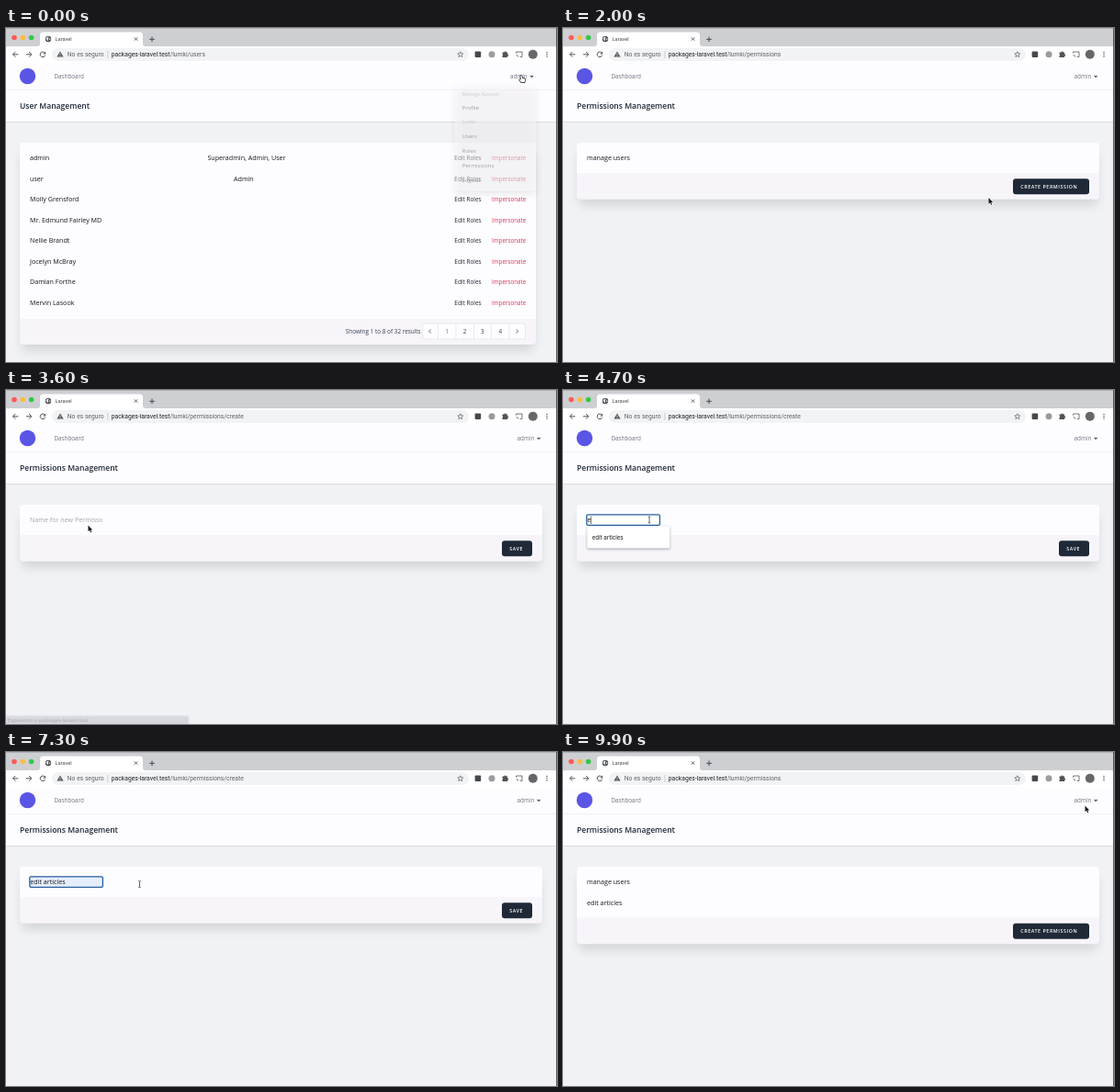
An HTML page with a canvas for the animation above (10 s loop, 600 px wide and 364 px high).

```html
<!DOCTYPE html>
<html lang="es">
<head>
<meta charset="utf-8">
<title>Laravel</title>
<style>
  html, body { margin: 0; width: 100%; height: 100%; overflow: hidden; background: #f0f2f6; }
  canvas { display: block; width: 600px; height: 364px; }
</style>
</head>
<body>
<canvas id="stage"></canvas>
<script>
const W = 600, H = 364, LOOP = 10000, STEP = 100;
const canvas = document.getElementById('stage');
const ctx = canvas.getContext('2d');
const dpr = Math.max(1, window.devicePixelRatio || 1);
canvas.width = W * dpr;
canvas.height = H * dpr;

const PAGE = '"Open Sans", sans-serif';
const UI = 'Roboto, sans-serif';
const INK = '#16181d', DARK = '#1f2937', GREY = '#6b7280', RED = '#d8365f';

const PEOPLE = ['admin', 'user', 'Molly Grensford', 'Mr. Edmund Fairley MD',
  'Nellie Brandt', 'Jocelyn McBray', 'Damian Forthe', 'Mervin Lasook'];
const MENU = [['Manage Account', 72, 1], ['Profile', 87], ['Lumki', 103, 1], ['Users', 119],
  ['Roles', 135], ['Permissions', 152], ['Logout', 168]];
const HINTS = ['edit articles', 'manage users', 'create articles', 'delete articles',
  'publish articles', 'view articles'];

// time, x, y of the pointer tip
const PATH = [[0, 561, 52], [200, 561, 52], [500, 540, 85], [800, 522, 122], [1000, 516, 150],
  [1100, 517, 151], [1300, 525, 157.5], [1600, 502, 170], [2000, 463.5, 185], [2300, 464, 185],
  [2600, 516, 174], [2800, 522, 171], [3000, 490, 172], [3300, 250, 160], [3600, 89.5, 147.5],
  [4000, 93, 142], [4200, 94, 141.5], [7200, 94, 141.5], [7600, 300, 152], [8000, 548, 172],
  [8300, 564, 171.5], [8900, 564, 171.5], [9400, 563, 173.5], [9600, 561, 140], [9900, 568.5, 58.5]];
const POINTERS = [[0, 'hand'], [300, 'arrow'], [500, 'hand'], [1200, 'arrow'], [2600, 'hand'],
  [2900, 'arrow'], [4000, 'beam'], [5600, 'none'], [7300, 'beam'], [7400, 'arrow'],
  [8000, 'hand'], [9000, 'arrow']];
const TYPED = [[0, ''], [4700, 'e'], [4900, 'ed'], [5100, 'edi'], [5300, 'edit'], [5600, 'edit '],
  [5800, 'edit a'], [6000, 'edit ar'], [6200, 'edit art'], [7000, 'edit articles']];
const URLS = [[0, 'users'], [1200, 'permissions'], [2900, 'permissions/create'], [8800, 'permissions']];
const SCREENS = [[0, 'users'], [1600, 'list'], [3400, 'form'], [8900, 'list']];

const at = (steps, t) => steps.filter(s => s[0] <= t).pop()[1];
const within = (t, a, b) => t >= a && t < b;
const ramp = (t, a, b) => Math.min(1, Math.max(0, (t - a) / (b - a)));

function text(s, x, y, size, color, opt = {}) {
  ctx.font = `${opt.weight || 400} ${size}px ${opt.font || PAGE}`;
  ctx.letterSpacing = (opt.spacing || 0) + 'px';
  ctx.textBaseline = 'alphabetic';
  ctx.fillStyle = color;
  ctx.fillText(s, x, y + size * 0.36);
  const w = ctx.measureText(s).width;
  ctx.letterSpacing = '0px';
  return w;
}

function rect(x, y, w, h, color, r = 0) {
  ctx.fillStyle = color;
  ctx.beginPath();
  ctx.roundRect(x, y, w, h, r);
  ctx.fill();
}

function dot(x, y, r, color) {
  ctx.fillStyle = color;
  ctx.beginPath();
  ctx.arc(x, y, r, 0, 7);
  ctx.fill();
}

function stroke(d, color, width = 1, x = 0, y = 0) {
  ctx.save();
  ctx.translate(x, y);
  ctx.strokeStyle = color;
  ctx.lineWidth = width;
  ctx.stroke(new Path2D(d));
  ctx.restore();
}

function fillPath(d, color, x, y) {
  ctx.save();
  ctx.translate(x, y);
  ctx.fillStyle = color;
  ctx.fill(new Path2D(d));
  ctx.restore();
}

function shadowed(color, blur, dy, draw) {
  ctx.save();
  ctx.shadowColor = color;
  ctx.shadowBlur = blur * dpr;
  ctx.shadowOffsetY = dy * dpr;
  draw();
  ctx.restore();
}

function faded(alpha, draw) {
  if (alpha <= 0) return;
  ctx.save();
  ctx.globalAlpha = alpha;
  draw();
  ctx.restore();
}

function browser(t) {
  const loading = within(t, 1100, 1600) || within(t, 2900, 3400);
  rect(0, 0, W, 20, '#cecfd3');
  rect(0, 0, W, 0.7, '#aaabaf');
  ['#fc5b57', '#fdbc40', '#34c84a'].forEach((c, i) => dot(9 + 9.3 * i, 10.5, 2.8, c));
  fillPath('M34 20Q37 20 37 17V8Q37 4.5 40.500 4.500H145.500Q149 4.500 149 8V17Q149 20 152 20Z', '#fff', 0, 0);
  if (loading || within(t, 8600, 8900)) {
    ctx.save();
    ctx.translate(46, 12);
    ctx.rotate(t / 100 * 0.7);
    stroke('M0 -2.8A2.8 2.8 0 0 1 2.8 0', '#777a80', 0.8);
    ctx.restore();
  } else {
    dot(46, 12, 3.2, '#4b4e54');
    fillPath('M-2 -1.600L0 -2.500L.6 -1.200L-.4 -.2L.3 1L-.6 2.300L-1.600 .6L-2.500 0ZM1.200 -.8L2.600 -.6L2 1.400L1 .6Z', '#e8e9eb', 46, 12);
  }
  text('Laravel', 53.5, 12, 5.7, '#45484d', { font: UI });
  stroke('M-1.700 -1.700L1.700 1.700M1.700 -1.700L-1.700 1.700', '#4a4d52', 0.9, 141.5, 12);
  stroke('M-2.800 0H2.800M0 -2.800V2.800', '#45484d', 1, 159, 12.3);

  rect(0, 20, W, 18, '#fff');
  rect(50, 22, 454, 14, '#f1f3f4', 7);
  stroke('M3 0H-2.700M0 -2.800L-2.800 0L0 2.800', '#505358', 1, 10.3, 28.8);
  stroke('M-3 0H2.700M0 -2.800L2.800 0L0 2.800', '#505358', 1, 25, 28.8);
  if (loading) {
    stroke('M-2.300 -2.300L2.300 2.300M2.300 -2.300L-2.300 2.300', '#505358', 1, 40.2, 28.8);
  } else {
    stroke('M2.300 -1.600A2.800 2.800 0 1 0 2.700 .8', '#505358', 1, 40, 28.8);
    fillPath('M3.200 -3.200V-.4H.4Z', '#505358', 40, 28.8);
  }
  fillPath('M0 -3.200L3.600 3H-3.600Z', '#55585d', 59, 28.6);
  rect(58.6, 27.7, 0.8, 1.7, '#f1f3f4');
  rect(58.6, 30.1, 0.8, 0.7, '#f1f3f4');
  text('No es seguro', 66.8, 28.8, 6.75, '#5f6368', { font: UI });
  rect(110.6, 25, 0.6, 8, '#b4b7bb');
  const host = text('packages-laravel.test', 114.8, 28.8, 6.75, '#202124', { font: UI });
  text('/lumki/' + at(URLS, t), 114.8 + host, 28.8, 6.75, '#5f6368', { font: UI });
  stroke('M0 -3L.9 -1L3 -.8L1.400 .6L1.900 2.700L0 1.600L-1.900 2.700L-1.400 .6L-3 -.8L-.9 -1Z', '#55585d', 0.7, 494.8, 28.8);
  rect(510.6, 25.5, 6.6, 6.6, '#45484d', 1);
  dot(529, 28.8, 3.5, '#9a9c9f');
  fillPath('M-3 -2H-1A1.100 1.100 0 0 1 1.200 -2H2.600V0A1.100 1.100 0 0 1 2.600 2.200V3.500H-3V1.600A1 1 0 0 0 -3 -.2Z', '#505358', 543.5, 28.5);
  stroke('M-3.200 -1V-2.700H3.200V2.700H.8M-3.200 .8A2 2 0 0 1 -1.200 2.800', '#505358', 0.8, 558.8, 28.7);
  dot(573.8, 28.8, 5, '#66676a');
  for (let i = -1; i <= 1; i++) dot(589, 28.8 + i * 2.3, 0.75, '#505358');
}

function frame(title, user) {
  rect(0, 38, W, 326, '#f0f2f6');
  shadowed('rgba(0,0,0,.22)', 1.5, 0.6, () => rect(0, 38, W, 64, '#fdfcfe'));
  rect(0, 67.3, W, 0.6, '#eeedf2');
  dot(23.5, 52.5, 8.7, '#5b55e6');
  text('Dashboard', 52.5, 52.6, 6.3, GREY);
  text('admin', user, 52.6, 6.3, GREY);
  stroke('M-1.500 -.8L0 .8L1.500 -.8', '#4b5563', 1.2, user + 23.5, 52.6);
  text(title, 15, 85, 8.55, DARK, { weight: 600 });
}

function card(right, split, bottom) {
  const w = right - 15;
  shadowed('rgba(0,0,0,.13)', 12, 8, () => rect(17.5, 128, w - 5, bottom - 130, '#fff', 4));
  rect(15, 125, w, bottom - 125, '#f7f5fa', 4);
  rect(15, 125, w, split - 125, '#fdfcfe', [4, 4, 0, 0]);
}

function button(label, x, y, hover) {
  rect(x, y, 573 - x, 17, hover ? '#343b4a' : DARK, 3);
  text(label, x + 8.3, y + 8.6, 5.3, '#fff', { weight: 600, spacing: 0.58 });
}

function users() {
  frame('User Management', 549);
  card(577, 317, 345);
  PEOPLE.forEach((name, i) => {
    const y = 141.8 + 22.5 * i;
    text(name, 26, y, 7.15, INK);
    text('Edit Roles', 488.3, y + 0.2, 6.45, DARK);
    text('Impersonate', 529, y + 0.2, 6.25, RED);
  });
  text('Superadmin, Admin, User', 219.4, 141.8, 7.15, INK);
  text('Admin', 248, 164.3, 7.15, INK);
  text('Showing 1 to 8 of 32 results', 369.8, 330.7, 6.4, '#374151');
  rect(453, 321.8, 112.8, 17.4, '#d9dae0', 3);
  rect(453.5, 322.3, 111.8, 16.4, '#fdfcfe', 2.6);
  [470.3, 489.7, 509, 528.4, 547.7].forEach((x, i) => {
    rect(x, 322, 0.5, 17, '#d9dae0');
    if (i < 4) text(String(i + 1), x + 8, 330.7, 6.4, i ? '#374151' : GREY);
  });
  stroke('M1 -2L-1 0L1 2', '#4b5563', 0.9, 461.7, 330.5);
  stroke('M-1 -2L1 0L-1 2', '#4b5563', 0.9, 556.7, 330.5);
}

function menu(t) {
  const open = t < 1200 ? 0.5 + ramp(t, 0, 100) * 0.5 : 1 - ramp(t, 1100, 1340);
  if (open <= 0) return;
  const scale = 0.96 + 0.04 * open;
  const hover = within(t, 500, 700) ? 87 : within(t, 800, 900) ? 119
    : within(t, 900, 1000) ? 135 : within(t, 1000, 1300) ? 152 : 0;
  faded(open, () => {
    ctx.translate(577, 61);
    ctx.scale(scale, scale);
    ctx.translate(-577, -61);
    shadowed('rgba(0,0,0,.15)', 7, 4, () => rect(487, 61, 90, 119, '#fdfcfe', 3));
    if (hover) rect(487, hover - 8, 90, 16, '#f0f1f5');
    MENU.forEach(([label, y, small]) =>
      text(label, 494.8, y, small ? 5.35 : 6.3, small ? '#a3a8b3' : '#4b5563'));
  });
}

function list(t) {
  const two = t > 5000, shift = two ? 22.5 : 0;
  frame('Permissions Management', 556.6);
  card(584, 158 + shift, 186.8 + shift);
  text('manage users', 26, 141.8, 7.15, INK);
  if (two) text('edit articles', 26, 164.3, 7.15, INK);
  button('CREATE PERMISSION', 490, 164.2 + shift, within(t, 2600, 2900));
}

function hints(t) {
  const rows = t < 4700 ? HINTS : HINTS.slice(0, 1);
  shadowed('rgba(0,0,0,.35)', 2.5, 0.8, () =>
    rect(26.3, 148.2, 90, 7.4 + 17 * rows.length, '#fff', 1.5));
  if (t >= 6500) rect(26.3, 151.9, 90, 17, '#e9eaec');
  rows.forEach((s, i) => text(s, 31.8, 160.2 + 17 * i, 6.5, '#222428', { font: UI }));
}

function form(t) {
  const value = at(TYPED, t), focus = t >= 4400;
  frame('Permissions Management', 556.6);
  card(584, 158, 186.8);
  button('SAVE', 540, 164.2, t >= 8000);
  if (focus) rect(25.8, 135.8, 79.6, 11.6, t >= 7000 ? '#e6eefc' : '#fff', 1.2);
  ctx.save();
  ctx.beginPath();
  ctx.rect(25, 135, 80, 13);
  ctx.clip();
  const w = value ? text(value, 26.2, 141.8, 7.15, INK)
    : (text('Name for new Permission', 26, 141.8, 7.15, '#a4a8b1'), 0);
  ctx.restore();
  if (focus) {
    ctx.strokeStyle = '#285f9f';
    ctx.lineWidth = 1.3;
    ctx.beginPath();
    ctx.roundRect(25.8, 135.8, 79.6, 11.6, 1.4);
    ctx.stroke();
    if (t < 7000) rect(26.4 + w, 137.5, 0.6, 8.5, '#222');
  }
  if (within(t, 4400, 7000)) hints(t);
}

function status(t) {
  const hovering = within(t, 500, 1100);
  const alpha = t < 2000 ? ramp(t, 400, 600) * (1 - ramp(t, 1500, 1800))
    : ramp(t, 2500, 2700) * (1 - ramp(t, 3400, 3680));
  const link = within(t, 2500, 2900) ? 'permissions/create' : 'permissions';
  const label = hovering || within(t, 2500, 2900)
    ? 'packages-laravel.test/lumki/' + link : 'Esperando a packages-laravel.test...';
  faded(alpha, () => {
    shadowed('rgba(0,0,0,.4)', 2, 0, () => rect(-3, 355.3, 202, 12, '#dcdde1', 2));
    text(label, 2, 360.2, 5.75, '#45484d', { font: UI });
  });
}

function pointer(t) {
  const kind = at(POINTERS, t);
  if (kind === 'none') return;
  let i = PATH.findIndex(p => p[0] > t) - 1;
  if (i < 0) i = PATH.length - 2;
  const [t0, x0, y0] = PATH[i], [t1, x1, y1] = PATH[i + 1];
  const k = ramp(t, t0, t1);
  const x = x0 + (x1 - x0) * k, y = y0 + (y1 - y0) * k;
  if (kind === 'beam') {
    stroke('M-1.200 -3.600Q0 -3.600 0 -2.800V2.800Q0 3.600 -1.200 3.600M1.200 -3.600Q0 -3.600 0 -2.800M0 2.800Q0 3.600 1.200 3.600', '#222', 0.7, x, y);
    return;
  }
  const arrow = kind === 'arrow';
  const d = arrow
    ? 'M0 0V6.700L1.500 5.300L2.600 7.800L3.700 7.300L2.600 4.900H4.700Z'
    : 'M-.8 .3Q0 -.5 .7 .3L1.100 2.700L3.500 3.200Q4.300 3.500 4.200 4.600L3.600 7.300H.2L-1.900 4.800Q-2 3.800 -.8 4.200L-.3 4.500Z';
  stroke(d, arrow ? '#fff' : '#111', arrow ? 1.2 : 1.3, x, y);
  fillPath(d, arrow ? '#111' : '#fff', x, y);
}

function draw(t) {
  ctx.setTransform(dpr, 0, 0, dpr, 0, 0);
  const screen = at(SCREENS, t);
  if (screen === 'users') {
    users();
    menu(t);
  } else if (screen === 'list') list(t);
  else form(t);
  browser(t);
  status(t);
  rect(599.2, 0, 0.8, H, '#3a3b3f');
  pointer(t);
}

const start = performance.now();
function tick() {
  const t = (performance.now() - start) % LOOP;
  draw(Math.floor(t / STEP) * STEP);
  requestAnimationFrame(tick);
}
tick();
</script>
</body>
</html>
```
